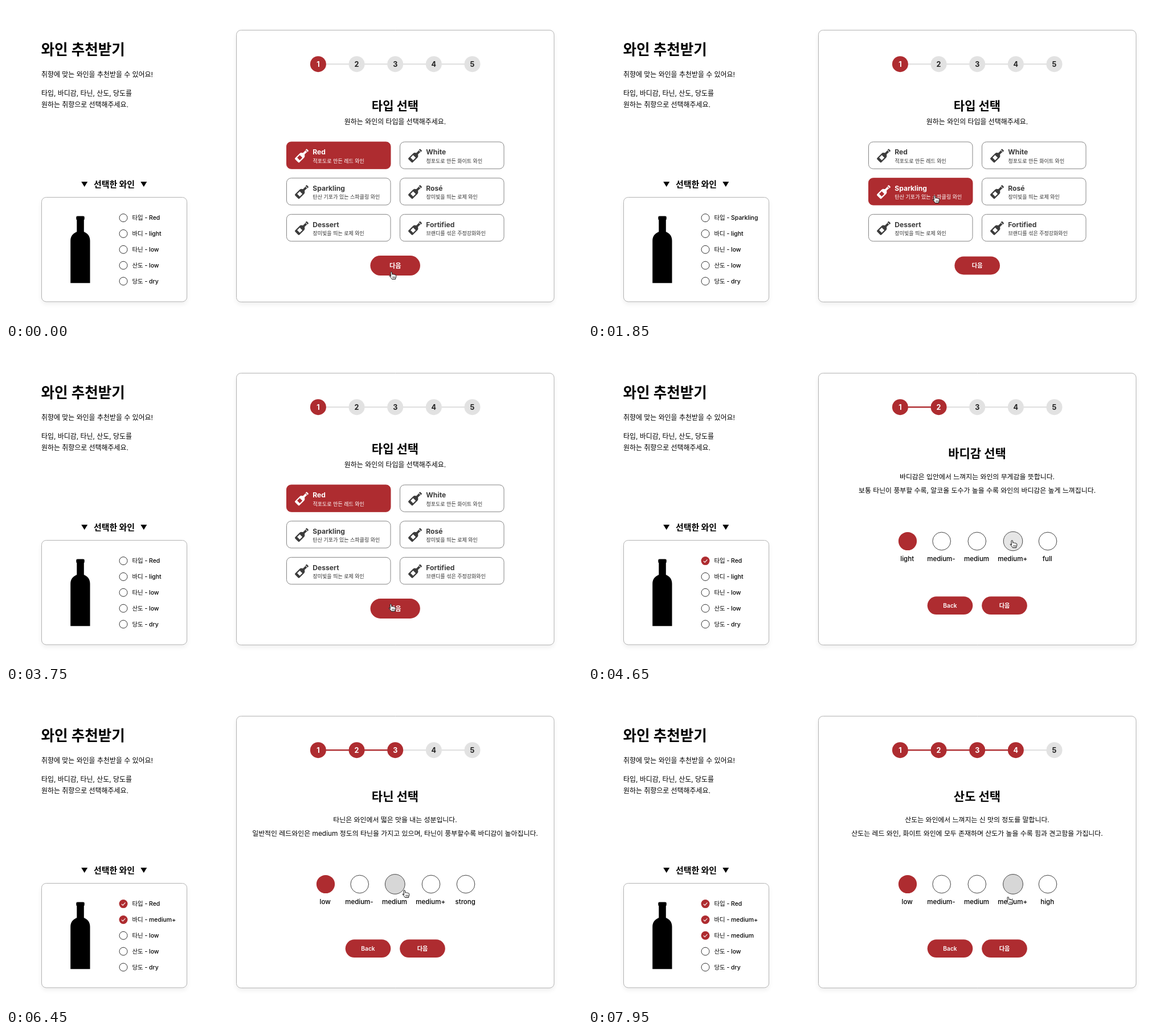
Write an HTML page with a canvas that moves like this. It is 1011 px wide and 554 px high and loops after 8000 ms.

```html
<!DOCTYPE html>
<html lang="ko">
<head>
<meta charset="utf-8">
<title>와인 추천받기</title>
<style>
html, body { margin: 0; width: 100%; height: 100%; overflow: hidden; background: #fff; }
canvas { display: block; width: 1011px; height: 554px; }
</style>
</head>
<body>
<canvas id="stage"></canvas>
<script>
const W = 1011, H = 554, LOOP = 8000;
const RED = '#ae2c30', GREY = '#e2e2e2', DARK = '#3c3c3c';
const FONT = 'Inter, "Noto Sans CJK KR", "Noto Sans CJK", sans-serif';
const canvas = document.getElementById('stage');
const ctx = canvas.getContext('2d');
const dpr = window.devicePixelRatio || 1;
canvas.width = W * dpr;
canvas.height = H * dpr;

const cards = [
  ['Red', '적포도로 만든 레드 와인'],
  ['White', '청포도로 만든 화이트 와인'],
  ['Sparkling', '탄산 기포가 있는 스파클링 와인'],
  ['Rosé', '장미빛을 띄는 로제 와인'],
  ['Dessert', '장미빛을 띄는 로제 와인'],
  ['Fortified', '브랜디를 섞은 주정강화와인']
];

const pages = [
  null,
  {
    title: '바디감 선택',
    lines: ['바디감은 입안에서 느껴지는 와인의 무게감을 뜻합니다.',
      '보통 타닌이 풍부할 수록, 알코올 도수가 높을 수록 와인의 바디감은 높게 느껴집니다.'],
    ends: ['light', 'full']
  },
  {
    title: '타닌 선택',
    lines: ['타닌은 와인에서 떫은 맛을 내는 성분입니다.',
      '일반적인 레드와인은 medium 정도의 타닌을 가지고 있으며, 타닌이 풍부할수록 바디감이 높아집니다.'],
    ends: ['low', 'strong']
  },
  {
    title: '산도 선택',
    lines: ['산도는 와인에서 느껴지는 신 맛의 정도를 말합니다.',
      '산도는 레드 와인, 화이트 와인에 모두 존재하며 산도가 높을 수록 힘과 견고함을 가집니다.'],
    ends: ['low', 'high']
  }
];

// Cursor moves: start, end, target x, target y, ease-out power (smoothstep if absent)
const startPos = [679, 474];
const moves = [
  [50, 850, 727, 341],
  [1250, 1650, 611, 340],
  [2050, 2400, 620, 270],
  [2650, 3350, 676, 447, 2.3],
  [3580, 3720, 678, 455],
  [3950, 4640, 747, 343],
  [4980, 5560, 731, 452],
  [5980, 6450, 702, 355],
  [6500, 6600, 698, 351],
  [6750, 7080, 731, 452],
  [7360, 7900, 740, 367]
];

// Hover spans: page, element, enter, leave
const hovers = [
  [0, 'next', -500, 280],
  [0, 'next', 3580, 9000],
  [1, 3, 4540, 5080],
  [1, 'next', 5400, 9000],
  [2, 'next', -500, 6080],
  [2, 2, 6230, 6830],
  [2, 'next', 6910, 9000],
  [3, 'next', -500, 7440],
  [3, 3, 7680, 9000]
];

const clamp = v => Math.max(0, Math.min(1, v));
const smooth = v => v * v * (3 - 2 * v);
const since = (t, times) => times.filter(s => t >= s).length;

function hoverAmount(t, page, item) {
  let amount = 0;
  for (const [p, id, enter, leave] of hovers) {
    if (p === page && id === item) {
      amount = Math.max(amount, smooth(clamp((t - enter) / 190)) * (1 - smooth(clamp((t - leave) / 190))));
    }
  }
  return amount;
}

function cursorAt(t) {
  let [x, y] = startPos;
  for (const [a, b, tx, ty, power] of moves) {
    if (t < a) break;
    const k = clamp((t - a) / (b - a));
    const e = power ? 1 - Math.pow(1 - k, power) : smooth(k);
    x += (tx - x) * e;
    y += (ty - y) * e;
  }
  return [x, y];
}

function text(str, x, cy, size, weight = 400, color = '#000', align = 'left') {
  ctx.font = `${weight} ${size}px ${FONT}`;
  ctx.textAlign = align;
  ctx.fillStyle = color;
  ctx.fillText(str, x, cy + size * 0.37);
}

function box(x, y, w, h, r, fill, stroke) {
  ctx.beginPath();
  ctx.roundRect(x, y, w, h, r);
  paint(fill, stroke);
}

function disc(x, y, r, fill, stroke) {
  ctx.beginPath();
  ctx.arc(x, y, r, 0, Math.PI * 2);
  paint(fill, stroke);
}

function paint(fill, stroke) {
  if (fill) { ctx.fillStyle = fill; ctx.fill(); }
  if (stroke) { ctx.strokeStyle = stroke; ctx.lineWidth = 1; ctx.stroke(); }
}

function panel(x, y, w, h) {
  ctx.save();
  ctx.shadowColor = 'rgba(0,0,0,0.07)';
  ctx.shadowBlur = 8 * dpr;
  ctx.shadowOffsetY = 4 * dpr;
  box(x, y, w, h, 8, '#fff');
  ctx.restore();
  box(x, y, w, h, 8, null, '#b3b3b3');
}

function triangle(x, y) {
  ctx.beginPath();
  ctx.moveTo(x - 5.5, y - 4.5);
  ctx.lineTo(x + 5.5, y - 4.5);
  ctx.lineTo(x, y + 4.5);
  ctx.fillStyle = '#000';
  ctx.fill();
}

function bigBottle() {
  ctx.fillStyle = '#000';
  ctx.beginPath();
  ctx.roundRect(123.3, 369.5, 14.4, 7, 2);
  ctx.fill();
  ctx.beginPath();
  ctx.moveTo(124.3, 375);
  ctx.lineTo(124.3, 397);
  ctx.bezierCurveTo(118, 400, 113.2, 404, 113.2, 413);
  ctx.lineTo(113.2, 487.3);
  ctx.lineTo(147.5, 487.3);
  ctx.lineTo(147.5, 413);
  ctx.bezierCurveTo(147.5, 404, 143, 400, 136.8, 397);
  ctx.lineTo(136.8, 375);
  ctx.fill();
}

function bottleIcon(x, y, color) {
  ctx.save();
  ctx.translate(x, y);
  ctx.rotate(Math.PI / 4);
  ctx.beginPath();
  ctx.roundRect(-2.6, -14.6, 5.2, 3.6, 0.9);
  ctx.moveTo(-1.9, -12);
  ctx.lineTo(-1.9, -5);
  ctx.bezierCurveTo(-3.5, -3.6, -5.4, -3, -5.4, 0);
  ctx.lineTo(-5.4, 11);
  ctx.quadraticCurveTo(-5.4, 12.8, -3.6, 12.8);
  ctx.lineTo(3.6, 12.8);
  ctx.quadraticCurveTo(5.4, 12.8, 5.4, 11);
  ctx.lineTo(5.4, 0);
  ctx.bezierCurveTo(5.4, -3, 3.5, -3.6, 1.9, -5);
  ctx.lineTo(1.9, -12);
  ctx.closePath();
  ctx.fillStyle = color;
  ctx.fill();
  ctx.fillStyle = color === '#fff' ? RED : '#fff';
  ctx.fillRect(-3.2, 1.9, 6.4, 6.4);
  ctx.restore();
}

function button(label, x, y, hover = 0) {
  ctx.save();
  ctx.translate(x, y);
  ctx.scale(1 + hover * 0.1, 1 + hover * 0.1);
  box(-39.8, -15.9, 79.6, 31.8, 15.9, RED);
  text(label, 0, 0, 10.2, 600, '#fff', 'center');
  ctx.restore();
}

function hand(x, y) {
  ctx.save();
  ctx.translate(x, y);
  ctx.lineJoin = ctx.lineCap = 'round';
  ctx.beginPath();
  ctx.moveTo(-3.6, 1.6);
  ctx.lineTo(-4, -5);
  ctx.bezierCurveTo(-4, -6.9, -1.7, -6.9, -1.5, -5.2);
  ctx.lineTo(-1, -1.6);
  ctx.bezierCurveTo(-0.4, -2.9, 1.2, -2.6, 1.5, -1.4);
  ctx.bezierCurveTo(2.2, -2.4, 3.6, -2, 3.8, -0.8);
  ctx.bezierCurveTo(4.6, -1.4, 5.7, -1, 5.8, 0.3);
  ctx.bezierCurveTo(5.9, 2.6, 5.5, 3.8, 4.7, 5);
  ctx.lineTo(4.6, 6.5);
  ctx.lineTo(-1.6, 6.5);
  ctx.bezierCurveTo(-2.4, 4.6, -4.2, 3.2, -5.7, 1.1);
  ctx.bezierCurveTo(-6.3, -0.2, -4.6, -0.8, -3.6, 1.6);
  ctx.closePath();
  paint('#fff', '#111');
  ctx.beginPath();
  for (const fx of [-0.1, 1.7, 3.5]) {
    ctx.moveTo(fx, 2);
    ctx.lineTo(fx, 4.6);
  }
  ctx.lineWidth = 0.7;
  ctx.stroke();
  ctx.restore();
}

function summary(page, values) {
  text('와인 추천받기', 61.5, 77, 25.6, 700);
  text('취향에 맞는 와인을 추천받을 수 있어요!', 62, 121, 11.95);
  text('타입, 바디감, 타닌, 산도, 당도를', 62, 153.5, 11.95);
  text('원하는 취향으로 선택해주세요.', 62, 173.5, 11.95);
  triangle(137.7, 313.5);
  triangle(241.8, 313.5);
  text('선택한 와인', 190, 313.5, 14.9, 700, '#000', 'center');
  panel(62.5, 336.5, 255, 183.5);
  bigBottle();
  ['타입', '바디', '타닌', '산도', '당도'].forEach((name, i) => {
    const y = 372.6 + i * 27.85;
    if (i < page) {
      disc(206, y, 7.5, RED);
      ctx.beginPath();
      ctx.moveTo(202.7, y + 0.2);
      ctx.lineTo(205.1, y + 2.5);
      ctx.lineTo(209.4, y - 2.2);
      ctx.strokeStyle = '#fff';
      ctx.lineWidth = 1.1;
      ctx.stroke();
    } else {
      disc(206, y, 7, '#fff', '#333');
    }
    text(`${name} - ${values[i]}`, 221.5, y, 10.45, 500);
  });
}

function stepper(page) {
  const stepX = i => 547.9 + i * 67.65;
  for (let i = 0; i < 4; i++) {
    ctx.fillStyle = i < page ? RED : GREY;
    ctx.fillRect(stepX(i), 101, 67.65, 2.4);
  }
  for (let i = 0; i < 5; i++) {
    const done = i <= page;
    disc(stepX(i), 102.2, 14, done ? RED : GREY);
    text(String(i + 1), stepX(i), 102.2, 12.6, 700, done ? '#fff' : '#222', 'center');
  }
}

function typePage(t, selected) {
  text('타입 선택', 683, 175, 21, 700, '#000', 'center');
  text('원하는 와인의 타입을 선택해주세요.', 683, 204, 11.95, 400, '#000', 'center');
  cards.forEach(([name, note], i) => {
    const x = 492.5 + (i % 2) * 199, y = 239 + Math.floor(i / 2) * 63.7;
    const on = name === selected;
    box(x, y, 182.5, 47.3, 8, on ? RED : '#fff', on ? RED : '#858585');
    bottleIcon(x + 26.7, y + 24.2, on ? '#fff' : DARK);
    text(name, x + 45.8, y + 17.9, 12.1, 700, on ? '#fff' : DARK);
    text(note, x + 46, y + 33.3, 9, 400, on ? '#fff' : '#333');
  });
  button('다음', 683.2, 456.5, hoverAmount(t, 0, 'next'));
}

function levelPage(t, page, selected) {
  const { title, lines, ends } = pages[page];
  text(title, 683, 183, 21, 700, '#000', 'center');
  lines.forEach((line, i) => text(line, 683, 224.3 + i * 24, 11.92, 400, '#000', 'center'));
  const labels = [ends[0], 'medium-', 'medium', 'medium+', ends[1]];
  [561, 620.7, 682.8, 746, 807].forEach((x, i) => {
    const hover = hoverAmount(t, page, i);
    const shade = Math.round(255 - 40 * hover);
    const r = 15.8 * (1 + hover * 0.1);
    if (labels[i] === selected) disc(x, 338, r + 0.3, RED);
    else disc(x, 338, r, `rgb(${shade},${shade},${shade})`, '#444');
    text(labels[i], x - 0.8, 369, 11.5, 500, '#000', 'center');
  });
  button('Back', 635.5, 451.2);
  button('다음', 731, 451.2, hoverAmount(t, page, 'next'));
}

function draw(t) {
  const page = since(t, [3950, 5800, 7350]);
  const type = ['Red', 'Rosé', 'Sparkling', 'Red'][since(t, [1250, 1850, 2650])];
  const body = t < 4950 ? 'light' : 'medium+';
  const tannin = t < 6750 ? 'low' : 'medium';
  const values = [type, body, tannin, 'low', 'dry'];

  ctx.setTransform(dpr, 0, 0, dpr, 0, 0);
  ctx.fillStyle = '#fff';
  ctx.fillRect(0, 0, W, H);
  summary(page, values);
  panel(404.5, 42.5, 557.5, 478);
  stepper(page);
  if (page === 0) typePage(t, type);
  else levelPage(t, page, values[page]);
  hand(...cursorAt(t));
}

const begin = performance.now();
function tick() {
  draw((performance.now() - begin) % LOOP);
  requestAnimationFrame(tick);
}
tick();
</script>
</body>
</html>
```
